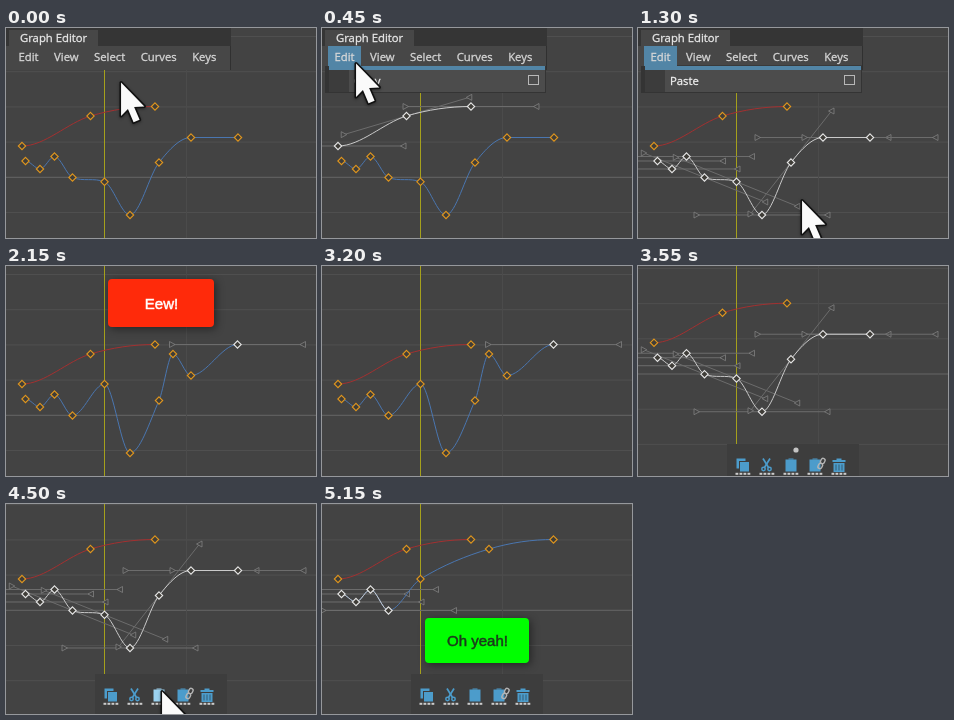
Recreate the animation shown at these times as an HTML page with a canvas. Size 310 by 210 pixels, loop 6300 ms.

```html
<!DOCTYPE html>
<html lang="en">
<head>
<meta charset="utf-8">
<title>Graph editor: copy and paste keys</title>
<style>
html, body { margin: 0; width: 310px; height: 210px; overflow: hidden; background: #434343; }
canvas { display: block; width: 310px; height: 210px; }
</style>
</head>
<body>
<canvas id="stage"></canvas>
<script>
const LOOP = 6300, STEP = 50;
const canvas = document.getElementById('stage');
const ctx = canvas.getContext('2d');
const dpr = window.devicePixelRatio || 1;
canvas.width = 310 * dpr;
canvas.height = 210 * dpr;

const MENU_FONT = '11.3px "Open Sans", "Noto Sans", sans-serif';
const NOTE_FONT = '15px "Liberation Sans", Arial, sans-serif';
const ACCENT = '#5285a6', ICON = '#4c9ccb', HOT = '#9bd2f0', BAR = '#3d3d3d';
const RED = '#a33030', BLUE = '#4a76b0';

const between = (t, a, b) => t >= a && t < b;
const ramp = (t, a, b) => Math.min(1, Math.max(0, (t - a) / (b - a)));
const easeOut = p => 1 - (1 - p) ** 2;
const mix = (a, b, p) => a + (b - a) * p;

// Curves as [x, y] keys; pasting moves the red keys to the time marker
const MARKER = 98.5;
const red = [[16, 118], [84.5, 88], [149, 78.5]];
const blue = [[19.5, 133], [34, 141], [48.5, 128.5], [66.5, 149.5], [MARKER, 153.8],
  [124, 187], [153, 134.5], [185, 109.5], [232, 109.5]];
const pasted = red.map(([x, y]) => [x + MARKER - red[0][0], y]);
const merged = blue
  .filter(([x]) => pasted.every(([px]) => Math.abs(px - x) > 1))
  .concat(pasted)
  .sort((a, b) => a[0] - b[0]);
const replaced = blue.filter(([x]) => x < MARKER).concat(pasted);

const secant = ([x0, y0], [x1, y1]) => (y1 - y0) / (x1 - x0);

// Plateau tangents: flat at ends and extremes, never overshooting
function slopeAt(keys, i) {
  if (i === 0 || i === keys.length - 1) return 0;
  const before = secant(keys[i - 1], keys[i]), after = secant(keys[i], keys[i + 1]);
  if (before * after <= 0) return 0;
  const limit = 3 * Math.min(Math.abs(before), Math.abs(after));
  const mean = secant(keys[i - 1], keys[i + 1]);
  return Math.sign(mean) * Math.min(Math.abs(mean), limit);
}

// Cursor moves evenly through its path, then rests until it is hidden
const moves = [
  { from: 0, to: 600, hide: 850, path: [[114, 53], [63, 97], [24, 28], [60, 52]] },
  { from: 950, to: 1300, hide: 1500, path: [[70, 60], [141, 154], [163, 171]] },
  { from: 1500, to: 1550, hide: 1850, path: [[110, 90], [90, 53]] },
  { from: 3600, to: 3950, hide: 3950, path: [[165, 150], [63, 54], [103, 188]] },
  { from: 3950, to: 4350, hide: 5150, path: [[103, 188], [130, 105], [142, 110], [142, 110], [155, 186]] }
];

function cursorAt(t) {
  const move = moves.find(m => between(t, m.from, m.hide));
  if (!move) return null;
  const { from, to, path } = move;
  const pos = ramp(t, from, to) * (path.length - 1);
  const i = Math.min(Math.floor(pos), path.length - 2);
  return path[i].map((v, axis) => mix(v, path[i + 1][axis], pos - i));
}

function rect(x, y, w, h, color) {
  ctx.fillStyle = color;
  ctx.fillRect(x, y, w, h);
}

function stroke(color, width = 1) {
  ctx.strokeStyle = color;
  ctx.lineWidth = width;
  ctx.stroke();
}

function line(x1, y1, x2, y2, color, width) {
  ctx.beginPath();
  ctx.moveTo(x1, y1);
  ctx.lineTo(x2, y2);
  stroke(color, width);
}

function polygon(...points) {
  ctx.beginPath();
  points.forEach(([x, y]) => ctx.lineTo(x, y));
  ctx.closePath();
}

function ellipse(x, y, rx, ry = rx) {
  ctx.beginPath();
  ctx.ellipse(x, y, rx, ry, 0, 0, 7);
}

// Runs paint with the origin moved to x, y
function at(x, y, paint) {
  ctx.save();
  ctx.translate(x, y);
  paint();
  ctx.restore();
}

function text(str, x, y, ink, font = MENU_FONT, weight = 0.3) {
  ctx.font = font;
  ctx.fillStyle = ink;
  ctx.fillText(str, x, y);
  ctx.strokeStyle = ink;
  ctx.lineWidth = weight;
  ctx.strokeText(str, x, y);
}

function grid(shift) {
  rect(0, 0, 310, 210, '#434343');
  for (let i = 0; i < 8; i++) {
    const y = 8.5 + i * 35.2 + shift;
    line(0, y, 310, y, i === 4 ? '#666' : '#4f4f4f');
  }
  line(180.5, 0, 180.5, 210, '#4b4b4b');
}

function curve(keys, color, from, to) {
  ctx.beginPath();
  ctx.moveTo(...keys[from]);
  for (let i = from + 1; i < to; i++) {
    const [x0, y0] = keys[i - 1], [x1, y1] = keys[i];
    const d = (x1 - x0) / 3;
    ctx.bezierCurveTo(x0 + d, y0 + slopeAt(keys, i - 1) * d,
      x1 - d, y1 - slopeAt(keys, i) * d, x1, y1);
  }
  stroke(color);
}

function handles([x, y], slope) {
  const d = 65.5 / Math.hypot(1, slope);
  line(x - d, y - slope * d, x + d, y + slope * d, '#6c6c6c');
  for (const side of [-1, 1]) at(x + side * d, y + side * slope * d, () => {
    ctx.scale(side, 1);
    polygon([-3, 0], [2.5, -3], [2.5, 3]);
    ctx.fillStyle = '#434343';
    ctx.fill();
    stroke('#808080', 0.8);
  });
}

function diamond([x, y], color) {
  polygon([x, y - 3.7], [x + 3.7, y], [x, y + 3.7], [x - 3.7, y]);
  ctx.fillStyle = '#3f3d38';
  ctx.fill();
  stroke(color, 1.1);
}

// Keys with index in [from, to) are selected
function channel(keys, color, from = 0, to = 0) {
  const selected = i => between(i, from, to);
  keys.forEach((k, i) => selected(i) && handles(k, slopeAt(keys, i)));
  if (to - from < keys.length) curve(keys, color, 0, keys.length);
  if (to - from > 1) curve(keys, '#cacaca', from, to);
  keys.forEach((k, i) => diamond(k, selected(i) ? '#e6e6e6' : '#e0961e'));
}

function graph(t) {
  const shift = -43 * easeOut(ramp(t, 3350, 3600));
  const redOn = between(t, 200, 1150) || between(t, 3800, 4100);
  const blueOn = between(t, 1150, 1900) || between(t, 3350, 3800) || between(t, 4100, 4550);
  grid(shift);
  line(MARKER, 0, MARKER, 210, '#a5a01c');
  at(0, shift, () => {
    channel(red, RED, 0, redOn ? red.length : 0);
    if (between(t, 1900, 3350)) channel(merged, BLUE, merged.length - 1, merged.length);
    else if (t >= 4550) channel(replaced, BLUE, 0, 4);
    else channel(blue, BLUE, 0, blueOn ? blue.length : 0);
  });
}

function menu(t) {
  if (t >= 1900) return;
  const item = between(t, 400, 850) ? 'Copy' : between(t, 1250, 1850) ? 'Paste' : '';
  rect(0, 0, 225, 42, '#474747');
  rect(0, 0, 225, 18, '#353535');
  rect(3, 2, 89, 17, '#474747');
  text('Graph Editor', 14, 14, '#e8e8e8');
  if (t >= 800) rect(7, 37, 217, 5, '#3a3a3a');
  rect(224, 18, 1, 24, '#303030');
  if (item) rect(6, 18, 33, 20, ACCENT);
  let x = 12.5;
  for (const label of ['Edit', 'View', 'Select', 'Curves', 'Keys']) {
    text(label, x, 32.5, '#d8d8d8');
    x += ctx.measureText(label).width + 15.5;
  }
  if (item) dropdown(item, between(t, 600, 800) || between(t, 1550, 1850));
}

function dropdown(label, hot) {
  rect(3, 38, 221, 27, '#343434');
  rect(7, 38, 216, 4, ACCENT);
  rect(7, 42, 20, 22, '#3c3c3c');
  rect(27, 42, 196, 22, '#4c4c4c');
  if (hot) rect(27, 42, 174, 22, ACCENT);
  text(label, 32, 56.5, '#f0f0f0');
  ctx.strokeStyle = '#b8b8b8';
  ctx.lineWidth = 1;
  ctx.strokeRect(206.5, 47.5, 10, 9);
}

// Icons are drawn around x = 0, from y = 0 to 13
function copyIcon(color) {
  rect(-6, 0, 9, 10, color);
  rect(-3.5, 2.5, 10, 11, BAR);
  rect(-2.5, 3.5, 9, 9.5, color);
}

function cutIcon(color) {
  for (const side of [-1, 1]) {
    line(side * 3.5, 0, side * -2, 9, color, 1.7);
    ellipse(side * 3, 10.5, 1.7);
    stroke(color, 1.5);
  }
}

function pasteIcon(color) {
  rect(-5, 1, 11, 12, color);
  rect(-2, 0, 5, 1, color);
}

function linkIcon(color) {
  pasteIcon(color);
  at(7, 5, () => {
    ctx.rotate(-1.1);
    for (const x of [-5.5, 0]) {
      ctx.beginPath();
      ctx.roundRect(x, -2, 5.5, 4, 2);
      stroke('#b5b5b5', 1.4);
    }
  });
}

function trashIcon(color) {
  rect(-2, 0, 5, 2, color);
  rect(-6, 1.5, 13, 2, color);
  rect(-5, 4.5, 11, 9, color);
  for (const x of [-3, 0, 3]) rect(x, 6, 1, 6, '#355c74');
}

function toolbar(t) {
  if (t < 3350) return;
  const icons = [copyIcon, cutIcon, pasteIcon, linkIcon, trashIcon];
  const hot = between(t, 3950, 4000) ? copyIcon : between(t, 4350, 5150) ? pasteIcon : null;
  at(0, 40 * (1 - ramp(t, 3350, 3600)), () => {
    rect(89, 170, 132, 42, BAR);
    icons.forEach((icon, i) => at(104.5 + 24 * i, 184.5, () => {
      icon(icon === hot ? HOT : ICON);
      for (let dot = 0; dot < 4; dot++) rect(dot * 4 - 7, 14.3, 2.8, 2, '#ccc');
    }));
    if (t < 4100) {
      const resting = t < 4000;
      ellipse(resting ? 158 : 156, resting ? 176 : 173.5, resting ? 2.6 : 4.5, 2.6);
      ctx.fillStyle = '#c4c4c4';
      ctx.fill();
      if (!resting) rect(154, 173, 4, 3, '#222');
    }
  });
}

function note(label, x, y, w, h, fill, ink) {
  ctx.save();
  ctx.shadowColor = 'rgba(0,0,0,.45)';
  ctx.shadowBlur = 9 * dpr;
  ctx.shadowOffsetX = ctx.shadowOffsetY = 2 * dpr;
  ctx.beginPath();
  ctx.roundRect(x, y, w, h, 4);
  ctx.fillStyle = fill;
  ctx.fill();
  ctx.restore();
  ctx.textAlign = 'center';
  text(label, x + w / 2 + 0.5, y + h / 2 + 5.5, ink, NOTE_FONT, 0.5);
  ctx.textAlign = 'left';
}

function cursor(t) {
  const spot = cursorAt(t);
  if (!spot) return;
  at(...spot, () => {
    ctx.scale(1.06, 1.06);
    ctx.shadowColor = 'rgba(0,0,0,.4)';
    ctx.shadowBlur = 3 * dpr;
    ctx.shadowOffsetY = dpr;
    polygon([1, 1.5], [1, 33], [7.5, 26.5], [12.8, 39], [18.5, 36.5], [13.3, 24.5], [23, 24]);
    ctx.lineJoin = 'round';
    stroke('#111', 3);
    ctx.shadowColor = 'transparent';
    ctx.fillStyle = '#fafafa';
    ctx.fill();
  });
}

function draw(now) {
  const t = Math.floor((now % LOOP) / STEP) * STEP;
  ctx.setTransform(dpr, 0, 0, dpr, 0, 0);
  graph(t);
  menu(t);
  toolbar(t);
  if (between(t, 2150, 3200)) note('Eew!', 102, 13, 106, 48, '#ff2a0a', '#fff');
  if (t >= 4950) note('Oh yeah!', 103, 114, 104, 45, '#00ff00', '#1c3a1c');
  cursor(t);
}

let start;
function tick(now) {
  start ??= now;
  draw(now - start);
  requestAnimationFrame(tick);
}
draw(0);
requestAnimationFrame(tick);
</script>
</body>
</html>
```
